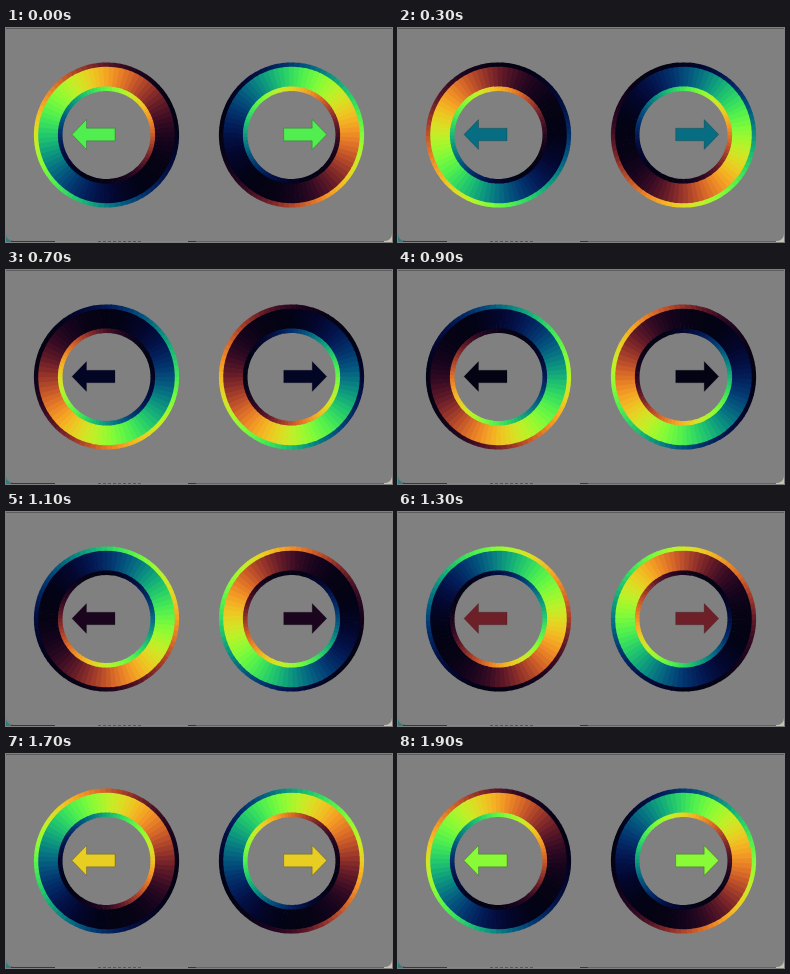
An HTML page with a canvas that plays this animation: 386 px wide and 214 px high, repeating every 2 s.

```html
<!DOCTYPE html>
<html lang="en">
<head>
<meta charset="utf-8">
<title>Colour rings</title>
<style>
  html, body { margin: 0; width: 100%; height: 100%; overflow: hidden; background: #808080; }
  canvas { display: block; width: 386px; height: 214px; }
</style>
</head>
<body>
<canvas id="stage" width="386" height="214"></canvas>
<script>
const ctx = document.getElementById('stage').getContext('2d');
const LOOP = 2000, STEP = 100, FRAMES = LOOP / STEP;
const WEDGE = 4.5, LAG = 63;   // degrees
const RAD = Math.PI / 180;

// smooth hump around an angle, 1 at its peak and 0 opposite
const hump = (angle, peak, sharpness) =>
  ((1 + Math.cos((angle - peak) * RAD)) / 2) ** sharpness;

// green at 0, then teal, black, red, orange, yellow and lime
function colorAt(phase) {
  const r = 3 + 240 * hump(phase, 292, 3);
  const g = 3 + 247 * hump(phase, 342, 2);
  const b = 6 + 124 * hump(phase, 50, 3) + 36 * hump(phase, 250, 2);
  return `rgb(${r},${g},${b})`;
}

function band(cx, cy, inner, outer, green) {
  ctx.lineWidth = outer - inner;
  for (let a = 0; a < 360; a += WEDGE) {
    ctx.strokeStyle = colorAt(a + WEDGE / 2);
    ctx.beginPath();
    // the small overlap hides seams between wedges
    ctx.arc(cx, cy, (inner + outer) / 2, -(green + a) * RAD, -(green + a + WEDGE + 0.6) * RAD, true);
    ctx.stroke();
  }
}

function ring(cx, green, spin) {
  const cy = 107;
  band(cx, cy, 48, 69, green);
  band(cx, cy, 68.3, 72.6, green + spin * LAG);
  band(cx, cy, 44, 48.6, green - spin * LAG);
}

function arrow(tipX, dir, color) {
  const tipY = 106.5, head = 14.5, wing = 15, length = 43, half = 6.3;
  const side = [[head, wing], [head, half], [length, half]];
  const mirrored = side.map(([x, y]) => [x, -y]).reverse();
  ctx.beginPath();
  for (const [x, y] of [[0, 0], ...side, ...mirrored]) ctx.lineTo(tipX + dir * x, tipY + y);
  ctx.closePath();
  ctx.fillStyle = color;
  ctx.fill();
  ctx.strokeStyle = 'rgba(0, 0, 0, 0.2)';
  ctx.lineWidth = 1;
  ctx.stroke();
}

function rect(color, x, y, w, h) {
  ctx.fillStyle = color;
  ctx.fillRect(x, y, w, h);
}

function backdrop() {
  rect('#6b6165', 0, 0, 386, 214);
  rect('#2f7f80', 0, 204, 8, 10);
  rect('#c8c4ac', 378, 204, 8, 10);
  rect('#3d353c', 5, 212, 44, 2);
  rect('#898488', 49, 212, 133, 2);
  for (let x = 92; x < 135; x += 5) rect('#5b5559', x, 213, 3, 1);
  rect('#3d353c', 182, 213, 8, 1);
  ctx.fillStyle = '#808080';
  ctx.beginPath();
  ctx.roundRect(0, 0, 386, 213, [0, 0, 7, 7]);
  ctx.fill();
  rect('#5c5c5c', 0, 0, 386, 1);
}

function draw(time) {
  const step = Math.floor((time % LOOP) / STEP);
  const turn = step * 360 / (FRAMES - 1);   // the last step meets the first
  const tint = colorAt(step * 360 / FRAMES);
  backdrop();
  ring(100.5, 160 + turn, 1);
  ring(285.5, 79 - turn, -1);
  arrow(66, 1, tint);
  arrow(320.7, -1, tint);
}

const start = performance.now();
function tick() {
  draw(performance.now() - start);
  requestAnimationFrame(tick);
}
tick();
</script>
</body>
</html>
```
